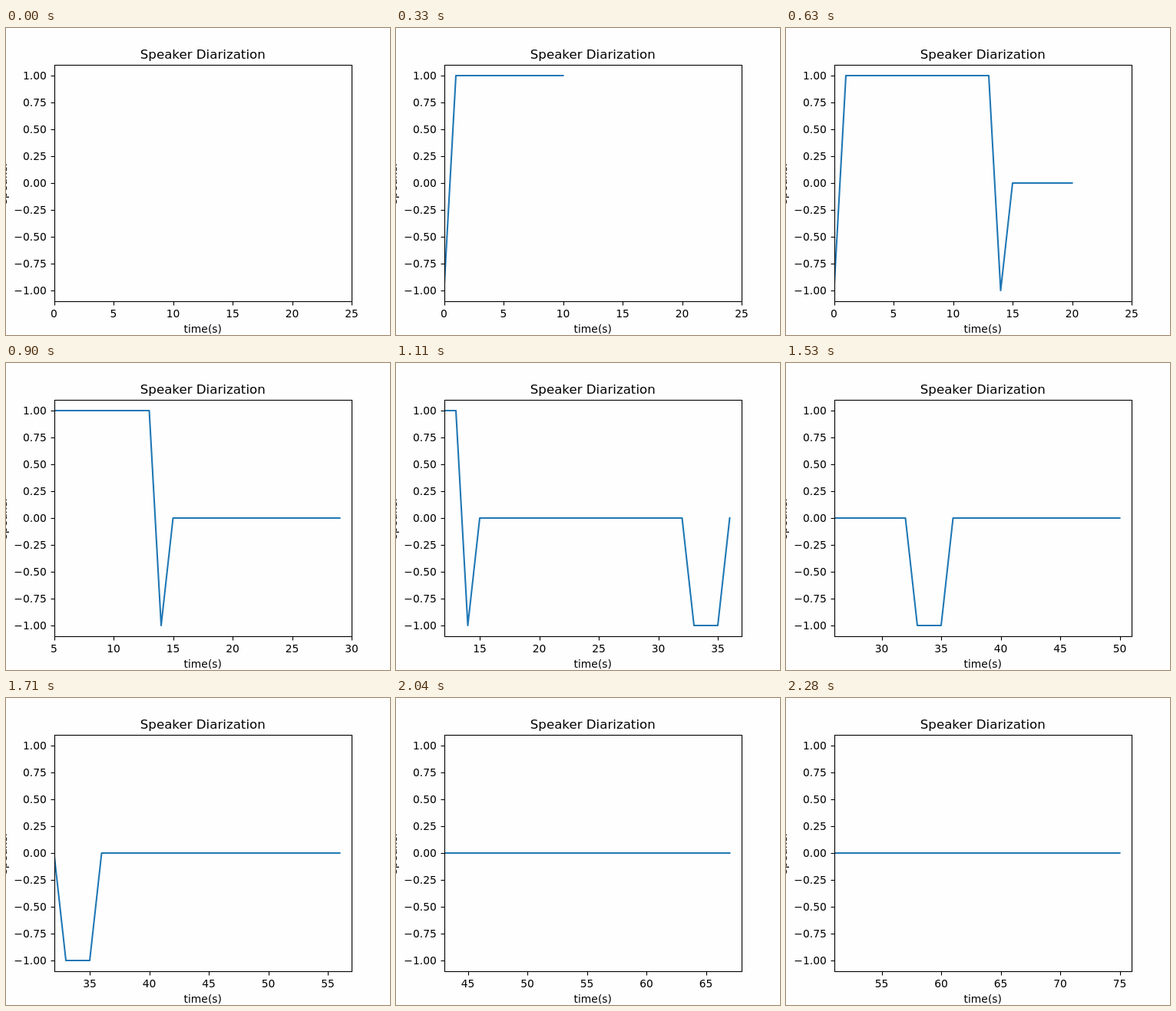
An HTML page with a canvas for the animation above (2310 ms loop, 500x400 px).

```html
<!DOCTYPE html>
<html lang="en">
<head>
<meta charset="utf-8">
<title>Speaker Diarization</title>
<style>
html, body { margin: 0; width: 100%; height: 100%; overflow: hidden; background: #fefefe; }
canvas { display: block; }
</style>
</head>
<body>
<canvas id="stage" width="500" height="400"></canvas>
<script>
const ctx = document.getElementById('stage').getContext('2d');
const LOOP = 2310, STEP = 30, SPAN = 25;
const LEFT = 62.5, RIGHT = 450, TOP = 48, BOTTOM = 356;
const MIDDLE = (LEFT + RIGHT) / 2;

// Corners of the signal: [second, speaker]
const corners = [[0, -1], [1, 1], [13, 1], [14, -1], [15, 0], [32, 0], [33, -1], [35, -1], [36, 0], [76, 0]];

const toY = value => 202 - 140 * value;
const snap = v => Math.floor(v + 0.5) + 0.5;

function text(str, x, y, align = 'center', size = 13.89) {
  ctx.font = `${size}px "DejaVu Sans", sans-serif`;
  ctx.textAlign = align;
  ctx.fillText(str, x, y);
}

function line(x1, y1, x2, y2) {
  ctx.beginPath();
  ctx.moveTo(x1, y1);
  ctx.lineTo(x2, y2);
  ctx.stroke();
}

function drawSignal(head, toX) {
  if (head === 0) return;
  ctx.save();
  ctx.beginPath();
  ctx.rect(63, TOP, RIGHT - 63, BOTTOM - TOP);
  ctx.clip();
  ctx.strokeStyle = '#1f77b4';
  ctx.lineWidth = 2.083;
  ctx.lineCap = 'square';
  ctx.lineJoin = 'round';
  ctx.beginPath();
  for (let i = 0; i < corners.length; i++) {
    const [second, value] = corners[i];
    if (second >= head) {
      const [s0, v0] = corners[i - 1];
      const at = v0 + (value - v0) * (head - s0) / (second - s0);
      ctx.lineTo(toX(head), toY(at));
      break;
    }
    ctx.lineTo(toX(second), toY(value));
  }
  ctx.stroke();
  ctx.restore();
}

function drawAxes(start, toX) {
  ctx.strokeStyle = ctx.fillStyle = '#000';
  ctx.lineWidth = 1.11;
  for (let s = Math.ceil(start / 5) * 5; s <= start + SPAN; s += 5) {
    const x = snap(toX(s));
    line(x, 356.5, x, 361.5);
    text(s, toX(s), 377);
  }
  for (let v = -1; v <= 1; v += 0.25) {
    const y = snap(toY(v));
    line(58.5, y, 63.5, y);
    text(v.toFixed(2).replace('-', '\u2212'), 52.8, toY(v) + 5, 'right');
  }
  ctx.strokeRect(63.5, 48.5, 387, 308);

  text('Speaker Diarization', MIDDLE, 40, 'center', 16.67);
  text('time(s)', MIDDLE, 397);
  ctx.save();
  ctx.translate(1, 202);
  ctx.rotate(-Math.PI / 2);
  text('speaker', 0, 0);
  ctx.restore();
}

function draw(now) {
  const head = Math.max(0, Math.floor((now % LOOP) / STEP) - 1);
  const start = Math.max(0, head - SPAN + 1);
  const toX = second => LEFT + (second - start) * (RIGHT - LEFT) / SPAN;
  ctx.fillStyle = '#fefefe';
  ctx.fillRect(0, 0, 500, 400);
  drawSignal(head, toX);
  drawAxes(start, toX);
}

const begin = performance.now();
function tick() {
  draw(performance.now() - begin);
  requestAnimationFrame(tick);
}
tick();
</script>
</body>
</html>
```
